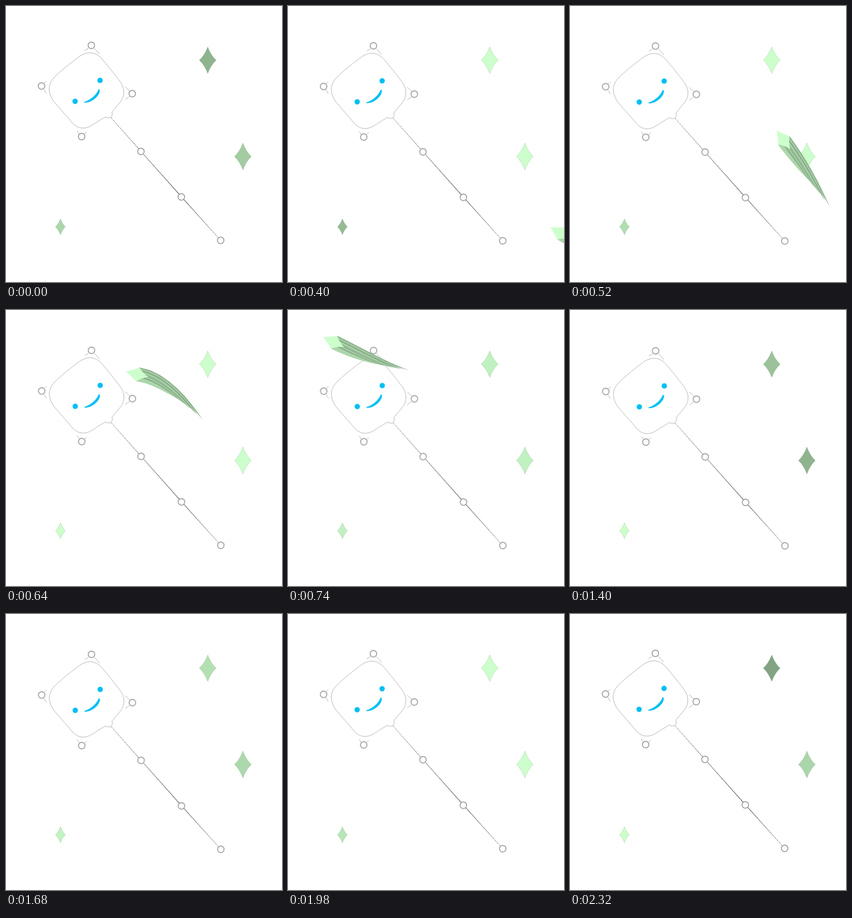
An HTML page that plays this animation: 540x540 px, repeating every 2340 ms.

```html
<!DOCTYPE html>
<html lang="en">
<head>
<meta charset="utf-8">
<title>Magic wand</title>
<style>
  html, body { margin: 0; width: 100%; height: 100%; overflow: hidden; background: #fff; }
  svg { display: block; width: 100%; height: 100%; }
  .wand { animation: bob 2340ms cubic-bezier(.37, 0, .63, 1) infinite; }
  .line { fill: #fff; stroke: #999; stroke-width: .8; }
  .stick { stroke: #666; stroke-width: .8; stroke-dasharray: 5 1.5; }
  .knob { fill: #fff; stroke: #999; stroke-width: 1.7; }
  .face { fill: #00bff3; }
  .spark { stroke: #8fb08f; stroke-width: .4; }
  @keyframes bob {
    50% { transform: translate(.5px, 3.2px); }
  }
</style>
</head>
<body>
<svg viewBox="0 0 540 540">
  <defs>
    <path id="route" d="M620 495L534 445C470 330 350 140 261 126.5C180 113 130 80 66 52"/>
  </defs>
  <g id="sparks"></g>
  <g class="wand">
    <path class="stick" d="M205 218L264 284.5L343 373.5L420 458.5"/>
    <path class="line" d="M146 97C162 88 176 90 188 104C201 119 211 132 221 145C233 160 234 176 222 190Q214 199 207 208
      A7.6 7.6 0 0 1 195 217C183 223 174 230 167 234C153 242 140 240 130 229C118 214 104 200 93 186
      C82 170 81 154 94 140C108 126 128 110 146 97Z"/>
    <path class="line" d="M161 83l-7 4M173 83l10 11M75 151l4-4M74 163l5 8M143 250l-4-6M154 250l4-3M242 166l-9-8M241 177l-8 6"/>
    <g id="knobs"></g>
    <g class="face">
      <circle cx="184" cy="145.5" r="5.2"/>
      <circle cx="135.2" cy="186.5" r="5.2"/>
      <path d="M153 187.5C164 185 177 174 180.5 164Q182 162 183.5 164.5C184 176 168 189 155 189.3Q152.5 189 153 187.5Z"/>
    </g>
  </g>
  <g id="comet" visibility="hidden"></g>
</svg>
<script>
const LOOP = 2340, TRAIL = 158;
const $ = id => document.getElementById(id);
const tint = k => `rgb(${[204, 255, 204].map(c => Math.round(c * k))})`;

function add(parent, tag, attrs) {
  const el = document.createElementNS('http://www.w3.org/2000/svg', tag);
  for (const key in attrs) el.setAttribute(key, attrs[key]);
  return parent.appendChild(el);
}

const knobs = [[167, 77], [69.5, 156.5], [247, 171.5], [148, 255.5], [264, 284.5], [343, 373.5], [420, 458.5]];
for (const [cx, cy] of knobs) add($('knobs'), 'circle', { class: 'knob', cx, cy, r: 6.4 });

// Twinkling four-pointed sparks: centre, radii, brightness over time
const beats = [0, 400, 640, 980, 1400, 1980, 2320];
const sparks = [
  [394.7, 106, 16.5, 26, [.7, 1, 1, .81, .76, 1, .64]],
  [463.5, 294.5, 16.5, 26.5, [.8, 1, 1, .81, .7, 1, .84]],
  [106.5, 432, 9.8, 15.8, [.84, .73, 1, .8, 1, .9, 1]]
];
for (const [x, y, w, h, glow] of sparks) {
  const a = w * .37, b = h * .37;
  const d = `M${x} ${y - h}Q${x + a} ${y - b} ${x + w} ${y}Q${x + a} ${y + b} ${x} ${y + h}` +
    `Q${x - a} ${y + b} ${x - w} ${y}Q${x - a} ${y - b} ${x} ${y - h}Z`;
  const frames = glow.map((k, i) => ({ fill: tint(k), offset: beats[i] / LOOP }));
  frames.push({ fill: tint(glow[6]), offset: 1 });
  add($('sparks'), 'path', { class: 'spark', d }).animate(frames, { duration: LOOP, iterations: Infinity });
}

// Shooting star with a ragged trail
const route = $('route'), comet = $('comet'), total = route.getTotalLength();
const shades = [.7, .82, .66, .84, .74];
const strands = Array.from({ length: 9 }, (_, i) => ({
  side: 10 - i * 2.5,
  len: TRAIL - i * 8 - (i % 2) * 5,
  el: add(comet, 'path', { fill: tint(shades[i % 5]) })
}));
const star = add(comet, 'path', { fill: tint(1), d: 'M24 0Q10 7 0 14Q-8 5 -21 0Q-8 -5 0 -14Q10 -7 24 0Z' });

function frameAt(s) {
  const end = Math.max(3, Math.min(total, s));
  const p = route.getPointAtLength(end), q = route.getPointAtLength(end - 3);
  const n = Math.hypot(p.x - q.x, p.y - q.y) || 1;
  return { x: p.x, y: p.y, nx: (q.y - p.y) / n, ny: (p.x - q.x) / n };
}

function drawComet(t) {
  const s = 99.5 + (t - 400) * 1.797;
  const on = s > 30 && s < total + TRAIL;
  comet.setAttribute('visibility', on ? 'visible' : 'hidden');
  if (!on) return;
  const size = Math.min(1, 1 - (s - total) / TRAIL);
  for (const { side, len, el } of strands) {
    const left = [], right = [];
    for (let j = 0; j <= 8; j++) {
      const u = j / 8, f = frameAt(s - u * len);
      const mid = side * (1 - .65 * u * u), half = 4 * (1 - u * u);
      const at = o => `${(f.x + f.nx * o * size).toFixed(2)} ${(f.y + f.ny * o * size).toFixed(2)}`;
      left.push(at(mid + half));
      right.unshift(at(mid - half));
    }
    el.setAttribute('d', 'M' + left.concat(right).join('L') + 'Z');
  }
  const end = Math.min(s, total);
  const p = route.getPointAtLength(end), q = route.getPointAtLength(end - 20);
  const angle = Math.atan2(p.y - q.y, p.x - q.x) * 180 / Math.PI;
  star.setAttribute('transform', `translate(${p.x} ${p.y}) rotate(${angle}) scale(${size})`);
}

let start;
function tick(now) {
  start ??= now;
  drawComet((now - start) % LOOP);
  requestAnimationFrame(tick);
}
requestAnimationFrame(tick);
</script>
</body>
</html>
```
